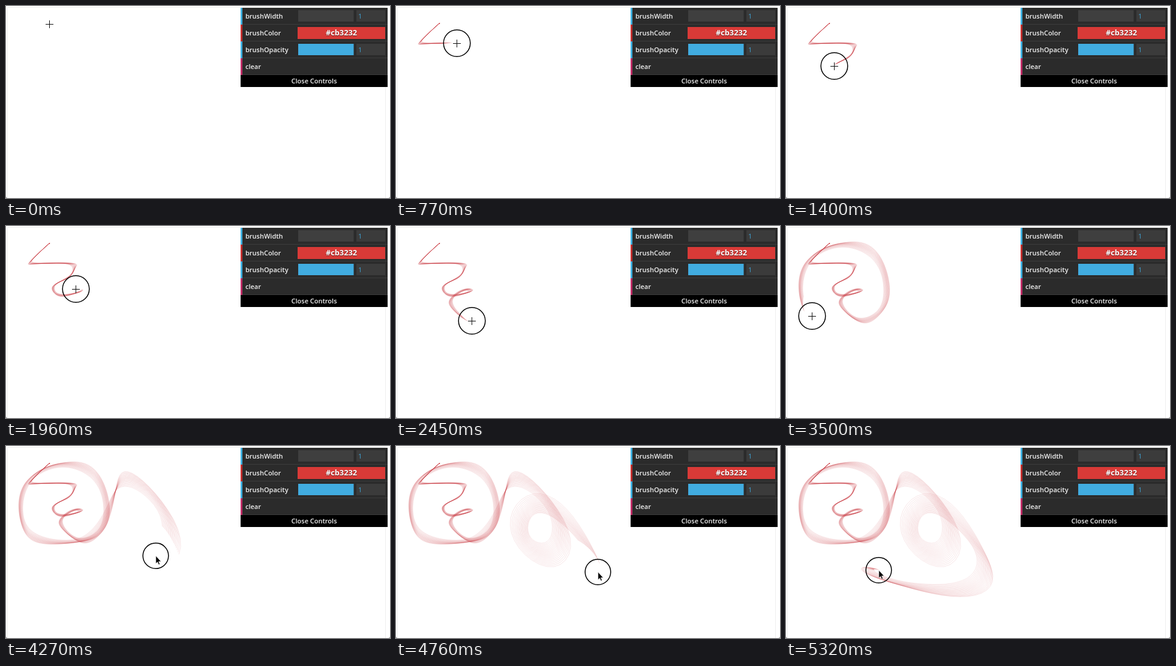
Write an HTML page that moves like this. It is 640 by 320 pixels and loops after 5390 ms.

```html
<!DOCTYPE html>
<html lang="en">
<head>
<meta charset="utf-8">
<title>Ribbon brush</title>
<style>
  html, body { margin: 0; width: 100%; height: 100%; overflow: hidden; background: #fff; }
  svg { display: block; width: 640px; height: 320px; }
  text { font: 600 11px "Open Sans", "Noto Sans", sans-serif; fill: #f2f2f2; }
  .value { fill: #3da3d6; font-weight: 400; }
  .hex { font-weight: 700; font-size: 12.8px; fill: #fff; text-shadow: 0 1px 1px #0009; }
  #ribbon path { fill: none; stroke: #c0353a; stroke-opacity: .12; stroke-linejoin: round; }
</style>
</head>
<body>
<svg viewBox="0 0 640 320">
  <rect width="640" height="320" fill="#8a8a8a"/>
  <rect y="-6" width="640" height="326" rx="3" fill="#fff"/>
  <path d="M2.5 320V2.5H632.5V320" fill="none" stroke="#eee"/>
  <g id="ribbon"></g>
  <g id="panel"></g>
  <g id="cursor">
    <circle id="ring" cx=".5" fill="none" stroke="#000" stroke-width="1.5"/>
    <path id="cross" d="M-6 .5H7M.5 -6V7" stroke="#111" fill="none"/>
    <path id="arrow" d="M.8 .3V12.8L3.6 10.3L5.6 14.8L7.4 14L5.5 9.6H9.3Z" fill="#000" stroke="#fff" stroke-width=".5"/>
  </g>
</svg>
<script>
const LOOP = 5390, FRAME = 70, LAST = LOOP - FRAME, RELEASE = 3990;
const STEP = 1000 / 60, STRANDS = 20, PULL = 0.1;
const $ = id => document.getElementById(id);

// Turning points of the pointer: ms, x, y. The ribbon follows from them.
const keys = [
  [0, 72, 30], [180, 71, 30], [430, 42, 58], [580, 48, 62],
  [770, 101, 62], [900, 112, 67], [1070, 109, 81], [1420, 79, 101],
  [1600, 88, 115], [1860, 125, 109], [1960, 116, 105], [2230, 91, 128],
  [2450, 126, 158], [2650, 167, 125], [2800, 154, 56], [3000, 92, 32],
  [3200, 38, 58], [3350, 25, 105], [3500, 43, 150], [3740, 140, 154],
  [3850, 168, 108], [4010, 196, 52], [4100, 245, 84], [4190, 281, 146],
  [4270, 249, 183], [4390, 206, 140], [4520, 243, 96], [4740, 336, 200],
  [4830, 300, 237], [5030, 162, 222], [5110, 142, 208], [5320, 154, 207]];

// Smooth Hermite curve through the turning points.
function pointerAt(ms) {
  const end = keys.length - 1;
  let i = 0;
  while (i < end - 1 && keys[i + 1][0] <= ms) i++;
  const a = keys[i], b = keys[i + 1], span = b[0] - a[0], f = (ms - a[0]) / span;
  const slope = (n, k) => {
    const p = keys[Math.max(n - 1, 0)], q = keys[Math.min(n + 1, end)];
    return (q[k] - p[k]) / (q[0] - p[0]);
  };
  return [1, 2].map(k => a[k] + (b[k] - a[k]) * f * f * (3 - 2 * f) +
    span * f * (1 - f) * (slope(i, k) * (1 - f) - slope(i + 1, k) * f));
}

function add(parent, name, attrs, text = '') {
  const node = document.createElementNS('http://www.w3.org/2000/svg', name);
  for (const key in attrs) node.setAttribute(key, attrs[key]);
  node.textContent = text;
  return parent.appendChild(node);
}

function buildPanel() {
  const panel = $('panel');
  const rect = (x, y, width, height, fill) => add(panel, 'rect', { x, y, width, height, fill });
  const label = (x, y, text, attrs) => add(panel, 'text', { x, y, ...attrs }, text);
  const slider = (y, fill) => {
    rect(487, y + 4, 92.5, 19, fill);
    rect(584, y + 4, 48, 19, '#3b3b3b');
    label(587, y + 18, '1', { class: 'value' });
  };
  const rows = [['brushWidth', '#3fb0e0'], ['brushColor', '#c5302e'],
                ['brushOpacity', '#3fb0e0'], ['clear', '#c02c66']];
  rect(391, 3, 245, 132, '#000');
  rows.forEach(([name, color], i) => {
    const y = 3 + i * 28;
    rect(391, y, 245, 28, '#2b2b2b');
    rect(391, y + 27, 245, 1, '#3c3c3c');
    rect(391, y, 3, 28, color);
    label(399, y + 18, name);
  });
  slider(3, '#3f3f3f');
  slider(59, '#41ace0');
  rect(486, 35, 146, 20, '#d93a37');
  label(559, 49, '#cb3232', { class: 'hex', 'text-anchor': 'middle' });
  label(513.5, 129, 'Close Controls', { 'text-anchor': 'middle' });
}

// Each strand is a damped spring pulled by the pointer; looser ones swing wider.
function buildStrand(ease) {
  const pos = pointerAt(0), speed = [0, 0];
  const steps = [`M${pos}`];
  for (let ms = STEP; ms <= LAST + 1; ms += STEP) {
    pointerAt(ms).forEach((target, k) => {
      speed[k] = (speed[k] + (target - pos[k]) * PULL) * ease;
      pos[k] += speed[k];
    });
    steps.push(`L${pos[0].toFixed(1)} ${pos[1].toFixed(1)}`);
  }
  return { node: add($('ribbon'), 'path', {}), steps };
}

buildPanel();
const strands = Array.from({ length: STRANDS }, (_, k) =>
  buildStrand(0.6 + 0.2 * (k + 0.4 * Math.sin(k * 12.9)) / (STRANDS - 1)));
const show = (id, on) => $(id).setAttribute('visibility', on ? 'visible' : 'hidden');
let shown = -1;

function draw(ms) {
  if (ms === shown) return;
  shown = ms;
  for (const { node, steps } of strands)
    node.setAttribute('d', ms ? steps.slice(0, Math.floor(ms / STEP) + 1).join('') : '');
  const [x, y] = pointerAt(ms).map(Math.round);
  $('cursor').setAttribute('transform', `translate(${x} ${y})`);
  const released = ms >= RELEASE;
  $('ring').setAttribute('r', released ? 21.3 : 22.3);
  show('ring', ms > 0);
  show('cross', !released);
  show('arrow', released);
}

const start = performance.now();
function tick() {
  const ms = (performance.now() - start) % LOOP;
  draw(Math.floor(ms / FRAME) * FRAME);
  requestAnimationFrame(tick);
}
tick();
</script>
</body>
</html>
```
